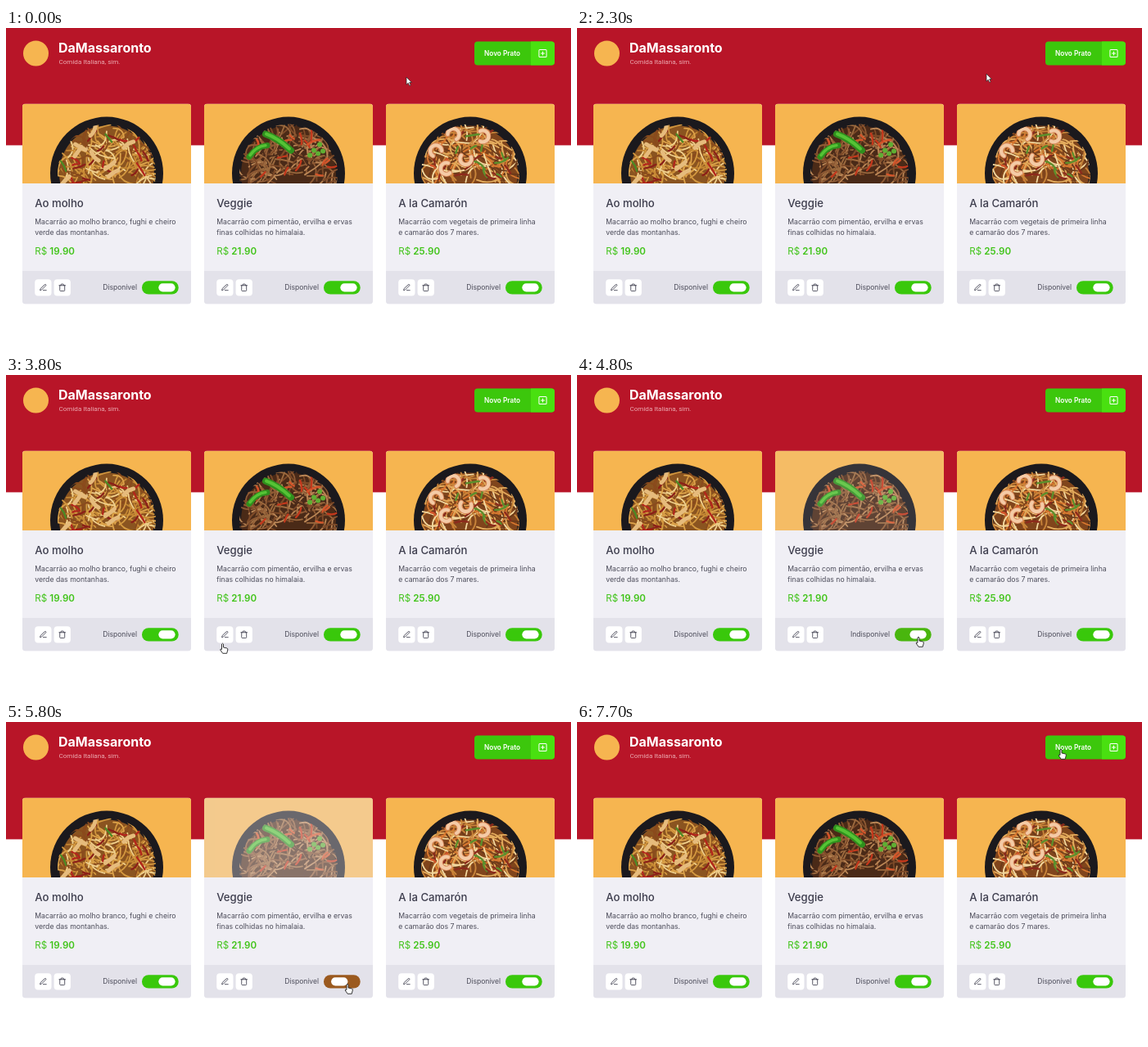
Recreate the animation shown at these times as an HTML page. Size 690 by 390 pixels, loop 8000 ms.

```html
<!DOCTYPE html>
<html lang="pt">
<head>
<meta charset="utf-8">
<title>Cardápio</title>
<style>
html, body { margin: 0; width: 100%; height: 100%; overflow: hidden; background: #fff; }
svg { display: block; width: 690px; height: 390px; font-family: Inter, sans-serif; fill: #3d3d4d; }
.brand { font-size: 16px; font-weight: 700; fill: #fff; }
.tag { font: 8.06px Roboto, sans-serif; fill: #eba9b0; }
.new { font-size: 8.25px; font-weight: 600; fill: #fff; }
.title { font-size: 13.2px; font-weight: 500; }
.desc { font-size: 8.7px; fill: #4b4b59; }
.price { font-size: 11.6px; fill: #41c41a; }
.price tspan { font-weight: 600; }
.label { font-size: 8.5px; text-anchor: end; fill: #4b4b59; }
.line { fill: none; stroke: #3d3d4d; stroke-width: 2; stroke-linecap: round; stroke-linejoin: round; }
.food { fill: none; stroke-linecap: round; }
</style>
</head>
<body>
<svg id="stage" viewBox="0 0 690 390"></svg>
<script>
const GREEN = [57, 200, 11], RED = [199, 40, 40];
const PEN = 'M12 20h9M16.5 3.5a2.12 2.12 0 0 1 3 3L7 19l-4 1 1-4z';
const BIN = 'M3 6h18M19 6v14a2 2 0 0 1-2 2H7a2 2 0 0 1-2-2V6M8 6V4a2 2 0 0 1 2-2h4a2 2 0 0 1 2 2v2';
const PLUS = 'M5 3h14a2 2 0 0 1 2 2v14a2 2 0 0 1-2 2H5a2 2 0 0 1-2-2V5a2 2 0 0 1 2-2zM12 8v8M8 12h8';

const dishes = [
  { name: 'Ao molho', price: '19.90',
    text: ['Macarrão ao molho branco, fughi e cheiro', 'verde das montanhas.'],
    base: '#8a5420', noodles: ['#dda34a', '#c48632', '#efcf8b', '#d3983f', '#8a4a1c'],
    bits: ['#b3261c', '#4c8a24', '#8c2018'] },
  { name: 'Veggie', price: '21.90',
    text: ['Macarrão com pimentão, ervilha e ervas', 'finas colhidas no himalaia.'],
    base: '#4a2a17', noodles: ['#9c6a3e', '#7d4a28', '#b98555', '#4a2a1a', '#8f5a34'],
    bits: ['#c4381c', '#d4552a', '#7d4a28'] },
  { name: 'A la Camarón', price: '25.90',
    text: ['Macarrão com vegetais de primeira linha', 'e camarão dos 7 mares.'],
    base: '#80451c', noodles: ['#e3ab5c', '#c9853a', '#f3d9a0', '#d9782f', '#6b3a1a'],
    bits: ['#d2542a', '#5c8f2c', '#8c2a1c'] }
];

let seed = 7;
const rnd = () => (seed = seed * 16807 % 2147483647) / 2147483647;
const pick = list => list[Math.floor(rnd() * list.length)];
const rect = (x, y, w, h, fill, r = 0, more = '') =>
  `<rect x="${x}" y="${y}" width="${w}" height="${h}" rx="${r}" fill="${fill}" ${more}/>`;
const text = (x, y, cls, s, more = '') => `<text x="${x}" y="${y}" class="${cls}" ${more}>${s}</text>`;
const icon = (d, cx, cy, size, more = '') =>
  `<path class="line" d="${d}" ${more} transform="translate(${cx} ${cy}) scale(${size / 24}) translate(-12 -12)"/>`;
const stroke = (d, color, w) => `<path d="${d}" stroke="${color}" stroke-width="${w}"/>`;

// A curved strand placed at random on the visible half of the plate
function strand(color, len, w, bend) {
  const a = Math.PI * (0.9 + 1.2 * rnd()), r = 56 * Math.sqrt(rnd()), dir = rnd() * 6.28;
  const x = 103 + r * Math.cos(a), y = 85 + r * Math.sin(a);
  const dx = len * Math.cos(dir), dy = len * Math.sin(dir), k = (rnd() - 0.5) * bend;
  return stroke(`M${x - dx} ${y - dy}Q${x - dy * k} ${y + dx * k} ${x + dx} ${y + dy}`, color, w);
}

function food(d, i) {
  let s = '';
  for (let n = 0; n < 130; n++) s += strand(pick(d.noodles), 9 + 9 * rnd(), 1.8, 3);
  for (let n = 0; n < 22; n++) s += strand(pick(d.bits), 3 + 6 * rnd(), 2.3, 1);
  if (i === 0) for (let n = 0; n < 8; n++) s += strand('#e6bb7c', 7, 5, 1);
  if (i === 1) {
    s += stroke('M75 37Q90 42 106 57', '#2f8f1d', 8) + stroke('M76 37Q90 42 104 55', '#55c335', 4) +
         stroke('M55 65Q64 52 77 51', '#2f8f1d', 7) + stroke('M56 63Q64 52 75 51', '#55c335', 3.5);
    for (const [x, y] of [[134, 57], [141, 50], [139, 61], [145, 58], [129, 63]])
      s += stroke(`M${x} ${y}h.1`, '#5fae33', 6);
  }
  if (i === 2) for (const [x, y, turn] of [[83, 37, 20], [119, 40, 80], [61, 57, 320], [97, 68, 180], [73, 79, 250]])
    s += `<g transform="translate(${x} ${y}) rotate(${turn})">` +
         stroke('M-7 3A7 7 0 1 1 5 5', '#d98a5c', 6) + stroke('M-7 3A7 7 0 1 1 5 5', '#f4cba6', 4) + '</g>';
  return s;
}

function card(d, i) {
  return `<g transform="translate(${20 + 222 * i} 92.6)" clip-path="url(#card)">
    ${rect(0, 0, 206, 245, '#f0eff5')}
    <g id="photo${i}" clip-path="url(#photo)">
      ${rect(0, 0, 206, 97.5, '#f6b550')}
      <circle cx="103" cy="85" r="69" fill="#1b191d"/>
      <circle cx="103" cy="85" r="58" fill="${d.base}"/>
      <g class="food" clip-path="url(#plate)">${food(d, i)}</g>
    </g>
    ${text(15.2, 126.4, 'title', d.name)}
    ${d.text.map((s, n) => text(15.2, 147.9 + 12.9 * n, 'desc', s)).join('')}
    ${text(15.2, 184.4, 'price', `R$ <tspan>${d.price}</tspan>`)}
    ${rect(0, 204.4, 206, 40.6, '#e3e2ea')}
    ${rect(15.2, 214.6, 20.3, 20.3, '#fff', 4)}${icon(PEN, 25.4, 224.7, 10.2)}
    ${rect(38.6, 214.6, 20.3, 20.3, '#fff', 4)}${icon(BIN, 48.7, 224.7, 10.2)}
    ${text(140, 227.9, 'label', 'Disponível', `id="label${i}"`)}
    ${rect(146, 216.6, 44.7, 16.3, `rgb(${GREEN})`, 8.1, `id="track${i}"`)}
    ${rect(166.3, 219.6, 20.3, 10.2, '#fff', 5.1, `id="knob${i}"`)}
  </g>`;
}

const stage = document.getElementById('stage');
stage.innerHTML = `<defs>
  <clipPath id="card">${rect(0, 0, 206, 245, '#000', 4.1)}</clipPath>
  <clipPath id="photo">${rect(0, 0, 206, 97.5, '#000')}</clipPath>
  <clipPath id="plate"><circle cx="103" cy="85" r="60"/></clipPath>
  </defs>
  ${rect(0, 0, 690, 143.4, '#b81528')}
  <circle cx="36.5" cy="31" r="15.5" fill="#f6b550"/>
  ${text(64, 29.5, 'brand', 'DaMassaronto')}
  ${text(64.5, 44, 'tag', 'Comida Italiana, sim.')}
  ${rect(572, 16.4, 98, 29.2, '#3cc70c', 4.1)}
  <path d="M641 16.4h25a4 4 0 0 1 4 4v21.2a4 4 0 0 1-4 4h-25z" fill="#49e010"/>
  ${text(584, 34, 'new', 'Novo Prato')}
  ${icon(PLUS, 655.5, 31, 12.2, 'style="stroke:#fff"')}
  ${dishes.map(card).join('')}
  <g id="cursor" stroke-linejoin="round">
    <path id="arrow" d="M0 0V9.2L2.2 7.2L3.7 10.5L5.2 9.8L3.7 6.6H6.4Z" fill="#fff" stroke="#222" stroke-width=".7"/>
    <path id="hand" d="M-1 1Q0-.6 1 1V5L5.5 6Q6.5 6.4 6.3 8L5.2 12.3H.2L-2.8 8Q-3 6.6-1 7.4Z" fill="#fff" stroke="#222" stroke-width=".9"/>
  </g>`;

const $ = id => document.getElementById(id);
const mix = (a, b, k) => a + (b - a) * k;

// CSS "ease": cubic-bezier(.25, .1, .25, 1)
function ease(x) {
  if (x <= 0) return 0;
  if (x >= 1) return 1;
  const bez = (p, q, u) => 3 * p * u * (1 - u) ** 2 + 3 * q * u * u * (1 - u) + u ** 3;
  let lo = 0, hi = 1;
  for (let i = 0; i < 20; i++) {
    const mid = (lo + hi) / 2;
    if (bez(.25, .25, mid) < x) lo = mid; else hi = mid;
  }
  return bez(.1, 1, lo);
}

const LOOP = 8000, OFF = 4755, ON = 5717;
const path = [
  [0, 489, 60], [2000, 489, 60], [2300, 500, 56], [2900, 470, 120], [3800, 264.5, 328],
  [4200, 330, 345], [4700, 417, 320], [6200, 417, 320], [6600, 477, 134],
  [7200, 575, 48], [7700, 591, 33], [LOOP, 591, 33]
];

function pointerAt(t) {
  const i = path.findIndex(p => p[0] > t);
  const [t0, x0, y0] = path[i - 1], [t1, x1, y1] = path[i];
  const k = (t - t0) / (t1 - t0);
  return [mix(x0, x1, k), mix(y0, y1, k)];
}

function clickable(x, y) {
  if (y < 46) return y > 16 && x > 572 && x < 670;
  const cx = (x - 20) % 222;
  return y > 306 && y < 329 && ((cx > 15 && cx < 60) || (cx > 146 && cx < 191));
}

function draw(now) {
  const t = Math.floor(now % LOOP / 100) * 100;
  const off = ms => t < ON ? ease((t - OFF) / ms) : 1 - ease((t - ON) / ms);
  const k = off(400);
  $('photo1').setAttribute('opacity', 1 - 0.7 * off(300));
  $('knob1').setAttribute('x', 166.3 - 16.3 * k);
  $('track1').setAttribute('fill', `rgb(${GREEN.map((c, i) => Math.round(mix(c, RED[i], k)))})`);
  $('label1').textContent = t >= OFF && t < ON ? 'Indisponível' : 'Disponível';

  const [x, y] = pointerAt(t), hand = clickable(x, y);
  $('cursor').setAttribute('transform', `translate(${x} ${y})`);
  $('arrow').style.display = hand ? 'none' : '';
  $('hand').style.display = hand ? '' : 'none';
}

const start = performance.now();
(function tick() {
  draw(performance.now() - start);
  requestAnimationFrame(tick);
})();
</script>
</body>
</html>
```
